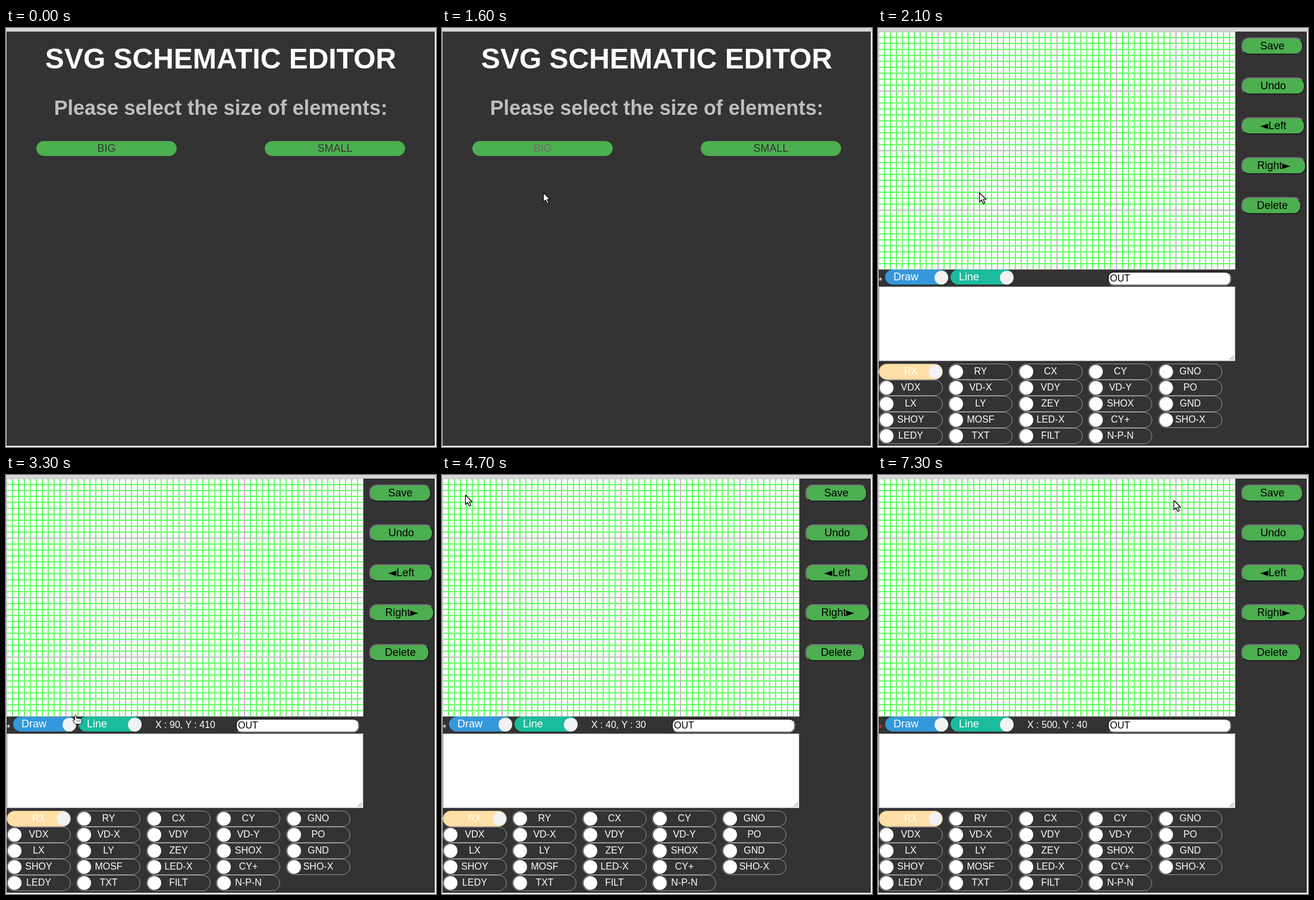
Write an HTML page that moves like this. It is 723 px wide and 704 px high and loops after 8 s.

```html
<!DOCTYPE html>
<html lang="en">
<head>
<meta charset="utf-8">
<title>Schematic editor</title>
<style>
  html, body { margin: 0; width: 100%; height: 100%; overflow: hidden; background: #d6d6d6; }
  body { font: 16px "Liberation Sans", Arial, sans-serif; color: #fff; }
  div { position: absolute; box-sizing: border-box; white-space: pre; }
  .center { text-align: center; }
  .page { left: 0; top: 0; width: 723px; height: 704px; }
  .choice { background: #4caf50; color: #333; border-radius: 13px; font-size: 18px; text-align: center; }
  .grid {
    background:
      linear-gradient(90deg, #c0bac0 2px, transparent 2px) -1px 0 / 100px 100px,
      linear-gradient(#c0bac0 2px, transparent 2px) 0 -1px / 100px 100px,
      linear-gradient(90deg, #6f6 2px, transparent 2px) -1px 0 / 10px 10px,
      linear-gradient(#6f6 2px, transparent 2px) 0 -1px / 10px 10px,
      #fff;
  }
  .action { border: 2px outset #767676; border-radius: 13px; color: #000; text-align: center; }
  .action span { font-family: "DejaVu Sans", sans-serif; line-height: 0; }
  .switch { border-radius: 13px; font-size: 18px; padding-left: 14px; }
  .part { border: 1px solid #999; border-radius: 14px; text-align: center; }
  .part.on { background: #ffdfa5; border-color: #b8a88a; }
  .knob { border-radius: 50%; background: #fff; }
  .soft { background: #f2f2f5; }
  .field { border: 2px inset #767676; border-radius: 10px; background: #fff; color: #000; padding-left: 2px; }
  .area { border: 1px solid #767676; background: #fff; }
  svg { position: absolute; left: 0; top: 0; }
</style>
</head>
<body>
<script>
const DURATION = 8000;

function box(parent, x, y, w, h, className = "", html = "", css = "") {
  const el = document.createElement("div");
  el.className = className;
  el.innerHTML = html;
  el.style.cssText = css;
  parent.append(el);
  place(el, x, y, w, h);
  return el;
}

function place(el, x, y, w, h) {
  const border = el.clientTop * 2;
  Object.assign(el.style, {
    left: x + "px", top: y + "px", width: w + "px", height: h + "px",
    lineHeight: h - border + "px"
  });
}

const mix = (a, b, k) => a + (b - a) * k;
const clamp = k => Math.max(0, Math.min(1, k));

// Window frame
box(document.body, 721, 6, 2, 698, "", "", "background:#f4f4f4");
box(document.body, 0, 702, 723, 2, "", "", "background:#f4f4f4");
box(document.body, 1, 6, 720, 696, "", "", "background:#333");

// Start page
const start = box(document.body, 0, 0, 723, 704, "page");
box(start, 1, 22, 720, 60, "center", "SVG SCHEMATIC EDITOR", "font-weight:bold;font-size:48px");
box(start, 1, 114, 720, 40, "center", "Please select the size of elements:",
  "font-weight:bold;font-size:34.2px;color:#bebdc0");
const big = box(start, 51, 190, 236, 25, "choice", "BIG");
box(start, 435, 190, 236, 25, "choice", "SMALL");

// Editor page
const editor = box(document.body, 0, 0, 723, 704, "page");
box(editor, 1, 6, 600, 400, "grid");

const actions = [["Save", 104], ["Undo", 107], ["<span>◄</span>Left", 107], ["Right<span>►</span>", 109], ["Delete", 101, 3]]
  .map(([label, width, indent = 0]) => ({
    width, el: box(editor, 0, 0, 0, 0, "action", label, `text-indent:${indent}px`)
  }));

const star = box(editor, 1, 414, 10, 24, "", "*");
[["Draw", 12, "#3498db"], ["Line", 122, "#1abc9c"]].forEach(([label, x, color]) => {
  box(editor, x, 406, 106, 25, "switch", label, `background:${color}`);
  box(editor, x + 82.5, 407.5, 23, 23, "knob soft");
});
const coords = box(editor, 251, 409, 130, 22);
box(editor, 386, 409, 208, 24, "field", "OUT");
box(editor, 1, 434, 600, 126, "area");

const parts = ["RX RY CX CY GNO", "VDX VD-X VDY VD-Y PO", "LX LY ZEY SHOX GND",
  "SHOY MOSF LED-X CY+ SHO-X", "LEDY TXT FILT N-P-N"];
parts.forEach((row, j) => row.split(" ").forEach((label, i) => {
  const textX = 1 + 117.5 * i, x = Math.floor(textX), y = 564 + 27 * j, on = label === "RX";
  box(editor, x, y, 108, 27, on ? "part on" : "part");
  box(editor, x + (on ? 84 : 2), y + 2, 23, 23, on ? "knob soft" : "knob");
  box(editor, textX, y, 108, 25, "center", label);
}));
editor.insertAdjacentHTML("beforeend",
  `<svg width="723" height="704"><path d="M591.5 557.5l7-7M595.5 557.5l3-3" stroke="#666"/></svg>`);

// Mouse pointer, with its tip at the origin
document.body.insertAdjacentHTML("beforeend", `
  <svg width="723" height="704"><g id="pointer" fill="#fff" stroke="#000" stroke-linejoin="round">
    <path id="arrow" d="M.5 .8V16.5L4.2 13L7 19.2L9.6 18L6.9 12H11.8Z" stroke-width="1.2"/>
    <g id="hand">
      <path d="M-2.5 9V1.5Q-1 -.8 .5 1.5V5.5L8 6.5Q9.5 7 9.5 9V12L8 15.5H-1.5L-5.5 10.5Q-5.5 8 -2.5 9Z"/>
      <path d="M1.5 9v4M4 9v4M6.5 9v4" stroke-dasharray="1"/>
    </g>
  </g></svg>`);
const [pointer, arrow, hand] = ["pointer", "arrow", "hand"].map(id => document.getElementById(id));

// Time, x, y of the smooth approach
const approach = [[100, 136, 82], [900, 167, 194], [1100, 168, 195], [1200, 168, 195], [1600, 170, 276]];
// Time, x, y of the pointer, then the coordinates on show
const jumps = [
  [3300, 118, 403, 90, 410], [3500, 139, 289, 140, 290], [3700, 131, 123, 130, 140],
  [3900, 91, 69, 90, 70], [4100, 63, 56, 70, 50], [4300, 45, 38, 50, 40],
  [4700, 39, 33, 40, 30], [4900, 39, 40, 40, 30], [5200, 42, 43, 40, 40],
  [5400, 43, 46, 40, 40], [5600, 39, 43, 40, 40], [6200, 355, 36, 320, 30],
  [6400, 440, 35, 430, 40], [6700, 466, 44, 460, 40], [6900, 484, 44, 480, 40],
  [7100, 495, 41, 500, 40], [7300, 497, 42, 500, 40]
];

function pointerAt(t) {
  const jump = jumps.findLast(p => p[0] <= t);
  if (jump) return jump.slice(1, 3);
  const next = approach.findIndex(p => p[0] > t);
  if (next < 1) return approach.at(next).slice(1);
  const a = approach[next - 1], b = approach[next], k = (t - a[0]) / (b[0] - a[0]);
  return [mix(a[1], b[1], k), mix(a[2], b[2], k)];
}

function draw(time) {
  const t = Math.floor(time / 100) * 100;
  const editing = t >= 1900;
  start.style.display = editing ? "none" : "";
  editor.style.display = editing ? "" : "none";

  const gray = mix(51, 110, clamp((t - 800) / 300));
  big.style.color = `rgb(${gray},${gray},${gray})`;

  const k = clamp((t - 1900) / 200);
  actions.forEach(({ el, width }, i) => {
    place(el, mix(608, 611, k), mix(13, 16, k) + i * mix(59.6, 67, k), width * mix(.916, 1, k), mix(27, 29, k));
    el.style.fontSize = mix(16.5, 18, k) + "px";
    el.style.background = `rgb(${mix(122, 76, k)},${mix(192, 175, k)},${mix(126, 80, k)})`;
  });

  star.style.color = t >= 6200 ? "#f33" : "#fff";
  const shown = jumps.findLast(p => p[0] <= t);
  coords.textContent = shown ? `X : ${shown[3]}, Y : ${shown[4]}` : "";

  const [x, y] = pointerAt(t).map(Math.round);
  const pointing = !editing && y >= 190 && y < 215 || y > 400;
  pointer.setAttribute("transform", `translate(${x} ${y})`);
  pointer.style.display = t < 100 ? "none" : "";
  arrow.style.display = pointing ? "none" : "";
  hand.style.display = pointing ? "" : "none";
}

const began = performance.now();
function tick() {
  draw((performance.now() - began) % DURATION);
  requestAnimationFrame(tick);
}
tick();
</script>
</body>
</html>
```
